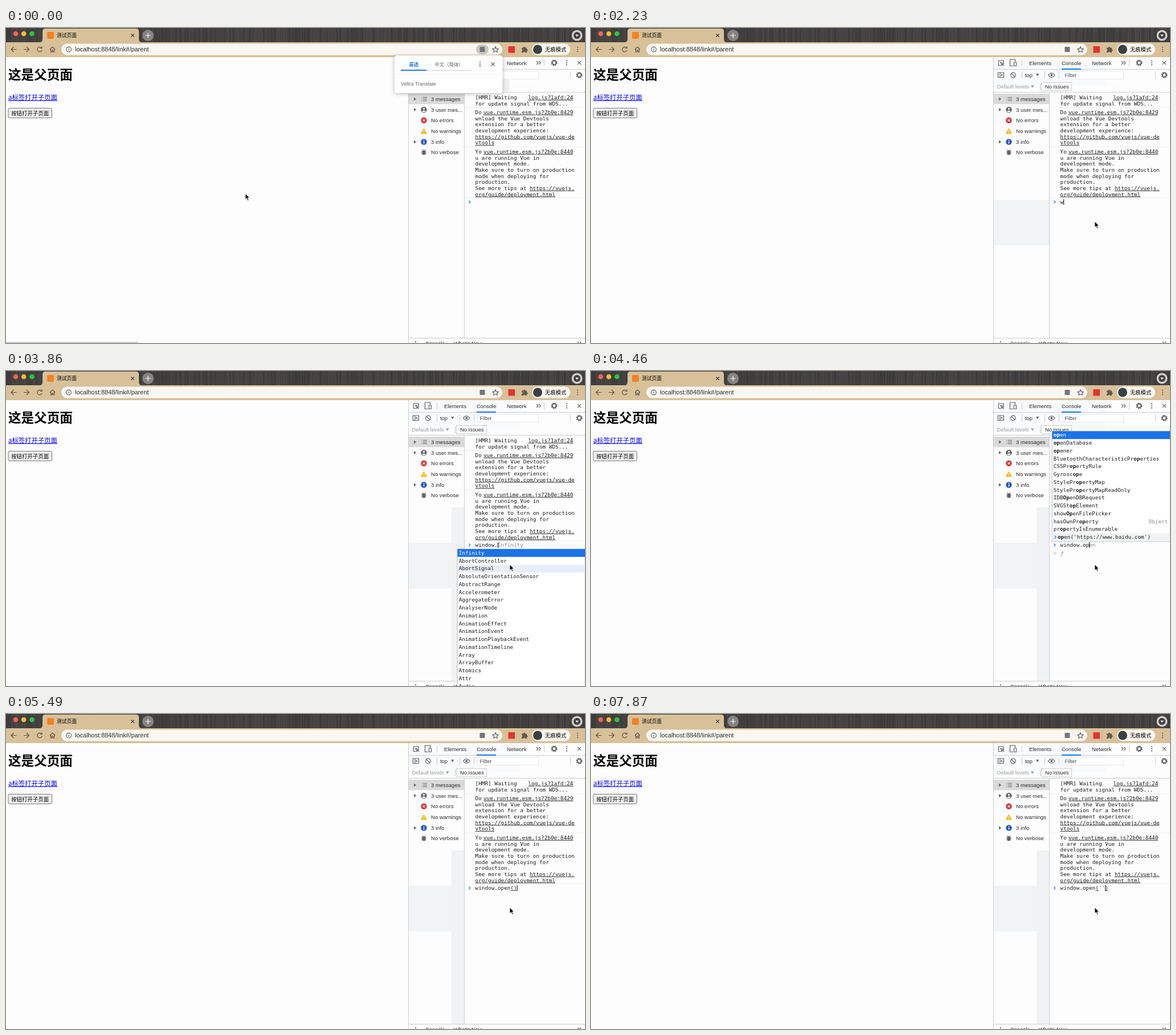
An HTML page that plays this animation: 1015 by 552 pixels, repeating every 8 s.

```html
<!DOCTYPE html>
<html lang="zh">
<head>
<meta charset="utf-8">
<title>测试页面</title>
<style>
  html, body { margin: 0; width: 100%; height: 100%; overflow: hidden; background: #fdfdfd; }
  svg { display: block; width: 100vw; height: 100vh; }
  text { font: 9.4px "Liberation Sans", Arial, sans-serif; fill: #2b2b2b; white-space: pre; }
  .cjk { font-family: "Noto Sans CJK SC", "Noto Sans CJK", sans-serif; fill: #000; }
  .mono { font: 9.33px "DejaVu Sans Mono", monospace; fill: #1c1c1c; }
  .link { text-decoration: underline; }
  .line { fill: none; stroke: #5f6368; stroke-width: 1.2; }
  .thin { stroke: #cacdd1; stroke-width: 1; }
  .faint { stroke: #f0f0f0; stroke-width: 1; }
  .side { font-size: 9.55px; }
  .dim { fill: #8a8a8a; }
  .pale { fill: #9c9c9c; }
  .white { fill: #fff; }
  .red { fill: #c41a16; }
  .bold { font-weight: bold; }
  .float { filter: drop-shadow(0 1px 3px rgba(0, 0, 0, .3)); }
</style>
</head>
<body>
<svg id="stage" viewBox="0 0 1015 552" preserveAspectRatio="none" xmlns="http://www.w3.org/2000/svg"></svg>
<script>
const CHAR = 5.617, ROW = 13.75, LINE = 10.67, LOOP = 8000;
const stage = document.getElementById('stage');

const text = (x, y, s, cls = '', extra = '') => `<text x="${x}" y="${y}" class="${cls}" ${extra}>${s}</text>`;
const mono = (x, y, s, cls = '') => text(x, y, s, 'mono ' + cls);
const cjk = (x, y, s, size, extra = '') => text(x, y, s, 'cjk', `style="font-size:${size}px;${extra}"`);
const rect = (x, y, w, h, fill, extra = '') => `<rect x="${x}" y="${y}" width="${w}" height="${h}" fill="${fill}" ${extra}/>`;
const circle = (x, y, r, fill, extra = '') => `<circle cx="${x}" cy="${y}" r="${r}" fill="${fill}" ${extra}/>`;
const path = (d, cls = 'line', extra = '') => `<path d="${d}" class="${cls}" ${extra}/>`;
const fill = (d, color) => `<path d="${d}" fill="${color}"/>`;
const cross = (x, y, r, extra = '') => path(`M${x - r} ${y - r}l${2 * r} ${2 * r}m0 ${-2 * r}l${-2 * r} ${2 * r}`, 'line', extra);
const dots = (x, y, gap = 3.7) => [-gap, 0, gap].map(d => circle(x, y + d, 1.1, '#5f6368')).join('');
const gear = (x, y) => circle(x, y, 3.4, 'none', 'stroke="#5f6368" stroke-width="2"') +
  circle(x, y, 4.8, 'none', 'stroke="#5f6368" stroke-width="1.6" stroke-dasharray="2 1.77"');

function stripes() {
  let seed = 7, out = rect(0, 0, 1015, 26, '#424140');
  const rnd = () => (seed = seed * 16807 % 2147483647) / 2147483647;
  for (let x = 0; x < 1015; x += 2 + rnd() * 3)
    out += rect(x.toFixed(1), 0, 1.2, 26, rnd() < .5 ? '#2c2b2b' : '#5c5a58', `opacity="${(.15 + rnd() * .4).toFixed(2)}"`);
  return out;
}

function browser() {
  const tan = '#d8c199', ink = 'style="stroke:#5b503d"';
  return stripes() +
    ['#ff5f57', '#febc2e', '#28c840'].map((c, i) => circle(17 + i * 14.2, 10, 4.3, c)).join('') +
    rect(0, 25, 1015, 25.5, tan) +
    fill('M58 25.5Q64 25 64 19V6Q64 1 69 1H228Q233 1 233 6V19Q233 25 239 25.5Z', tan) +
    rect(72, 7, 12, 12, '#f58220', 'rx="2"') +
    cjk(89, 16.4, '测试页面', 8.75) + cross(222, 13, 2.6, 'style="stroke:#222"') +
    circle(249, 13, 10, '#858481') + path('M244.5 13h9m-4.5 -4.5v9', 'line', 'style="stroke:#fff"') +
    circle(1001, 13, 9.5, '#cfccc7') + circle(1001, 13, 6, '#3f3e3d') + fill('M998 11.5h6l-3 4z', '#e8e5e0') +
    path('M18.5 37.5H9m4.5 -4.5l-4.5 4.5l4.5 4.5', 'line', ink) +
    path('M31 37.5h9.5m-4.5 -4.5l4.5 4.5l-4.5 4.5', 'line', ink) +
    path('M62 34.5A4.2 4.2 0 1 0 63 39M63 32.5v3h-3.2', 'line', ink) +
    path('M77 37.5l4.5 -4.5l4.5 4.5M78.5 37v5h2v-3h2v3h2v-5', 'line', ink) +
    rect(97, 27.5, 773, 20, '#faf7f2', 'rx="10"') +
    circle(110, 37.5, 4.3, 'none', 'class="line"') + rect(109.4, 36.8, 1.2, 3, '#5f6368') + rect(109.4, 34.8, 1.2, 1.2, '#5f6368') +
    text(121, 41.3, 'localhost:8848/link#/parent', '', 'style="font-size:10.87px"') +
    '<g id="pill">' + rect(824, 29, 22, 17, '#c9c6c0', 'rx="8.5"') + '</g>' +
    rect(830.5, 33, 9, 9, '#73767a', 'rx="1"') +
    path('M858 32.8l1.5 3.3l3.6 .4l-2.7 2.4l.8 3.5l-3.2 -1.8l-3.2 1.8l.8 -3.5l-2.7 -2.4l3.6 -.4z') +
    rect(880.5, 32, 11.5, 11.5, '#e5322d') +
    fill('M904 34.5h2.8a1.7 1.7 0 0 1 3.4 0h2.8v2.8a1.7 1.7 0 0 1 0 3.4v2.3h-3a1.5 1.5 0 0 0 -3 0h-3v-3a1.5 1.5 0 0 0 0 -3z', '#5f5a50') +
    rect(922, 27.5, 67, 20, '#faf7f2', 'rx="10"') + circle(932, 37.5, 8, '#3c4043') +
    cjk(945, 41, '无痕模式', 9.3) + dots(1002, 37.5) +
    rect(0, 50, 1015, 1, '#cdbb9b');
}

function page() {
  return cjk(4, 90.2, '这是父页面', 22.6, 'font-weight:bold') +
    cjk(4, 125.6, 'a标签打开子页面', 11.35, 'fill:#00e;text-decoration:underline') +
    rect(4, 140.5, 76.5, 17, '#efefef', 'rx="2" stroke="#767676"') +
    cjk(9.2, 152.6, '按钮打开子页面', 9.43);
}

function toolbar() {
  return '<g id="shade"></g>' +
    path('M719 65.5h-4.5v-8.5h8.5v4M718 60l5.5 2.2l-2.3 1l-1 2.3zM721 63l3 3') +
    path('M740 66.500h-5.500v-11.500h9v4M741.500 60h4v6.500h-4z') +
    path('M755.5 55v12M787.5 97v12', 'thin') +
    text(768, 64.5, 'Elements') + text(825, 64.5, 'Console') + text(878, 64.5, 'Network') +
    path('M930 58l3 3l-3 3m4 -6l3 3l-3 3') + path('M943.5 55v12', 'thin') +
    gear(961, 61) + dots(983, 61) + cross(1005, 61, 3.2) +
    path('M706 72.5h309M706 112.5h309M706 543.5h309M803.5 113v430M705.5 51v501', 'thin') +
    rect(825, 71, 34, 2, '#1a73e8') +
    path('M713.5 78h10v8.5h-10zM717 78v8.5m4.5 -6l-2.5 1.8l2.5 1.8') +
    circle(740, 82.5, 4.3, 'none', 'class="line"') + path('M737 79.5l6 6') +
    path('M755.5 76v13M795.5 76v13M820.5 76v13M989.5 76v13', 'thin') +
    text(761, 86, 'top') + fill('M780 80h5.5l-2.75 4.5z', '#6e6e6e') +
    path('M801.5 82.5q5.8 -7.5 11.6 0q-5.8 7.5 -11.6 0z') + circle(807.3, 82.5, 2, '#5f6368') +
    rect(826.5, 75.5, 107, 14, '#fff', 'stroke="#e4e6e8"') + text(830.5, 86.3, 'Filter', '', 'style="fill:#484848"') +
    gear(1005, 82.5) +
    text(711.5, 106, 'Default levels', 'pale') + fill('M771 100.5h5.5l-2.75 4.5z', '#9c9c9c') +
    rect(789.5, 95.5, 53, 14.5, '#fdfdfd', 'stroke="#cacdd1"') + text(796, 106.3, 'No Issues');
}

function sidebar() {
  const tri = y => fill(`M715 ${y - 3}v6l4.5 -3z`, '#6e6e6e');
  const labels = ['3 messages', '3 user mes...', 'No errors', 'No warnings', '3 info', 'No verbose'];
  return rect(706, 115, 97, 18.5, '#dadada') + tri(124.5) + tri(143) + tri(199.5) +
    path('M731 121.5h7m-7 3h7m-7 3h7m-9.5 -6h1m-1 3h1m-1 3h1') +
    circle(732.5, 143.2, 5.2, '#5f6368') + circle(732.5, 141.5, 1.7, '#fff') + fill('M729 146.3q3.5 -3.5 7 0q-3.5 2.6 -7 0z', '#fff') +
    circle(732.5, 161.8, 5.2, '#db3236') + cross(732.5, 161.8, 1.9, 'style="stroke:#fff"') +
    fill('M732.5 175.5l5.5 10h-11z', '#f0b400') + rect(732, 179, 1.2, 3.5, '#fff') + rect(732, 183.3, 1.2, 1.2, '#fff') +
    circle(732.5, 199.5, 5.2, '#2a56c6') + rect(731.8, 198.6, 1.5, 4, '#fff') + rect(731.8, 196.2, 1.5, 1.5, '#fff') +
    rect(730, 214, 5, 8.5, '#5f6368', 'rx="2.5"') + path('M728.5 215.7h8m-8.5 2.5h9m-8.5 2.5h8m-6 -7l-1 -1m5 1l1 -1') +
    labels.map((s, i) => text(745, (128 + i * 18.66).toFixed(1), s, 'side')).join('');
}

function log() {
  const at = (y, i) => (y + i * LINE).toFixed(1);
  const block = (y, lines) => lines.map((s, i) => mono(822.6, at(y, i), s)).join('');
  const link = (x, y, s) => mono(x, y, s, 'link');
  const hmr = 124.8, tools = 150.8, mode = 219.8;
  return path('M804 139.5h211m-211 69h211m-211 89h211', 'faint') +
    block(hmr, ['[HMR] Waiting', 'for update signal from WDS...']) + link(915.5, hmr, 'log.js?1afd:24') +
    block(tools, ['Do', 'wnload the Vue Devtools', 'extension for a better', 'development experience:']) +
    link(837, tools, 'vue.runtime.esm.js?2b0e:8429') +
    link(822.6, at(tools, 4), 'https://github.com/vuejs/vue-de') + link(822.6, at(tools, 5), 'vtools') +
    block(mode, ['Yo', 'u are running Vue in', 'development mode.', 'Make sure to turn on production',
      'mode when deploying for', 'production.', 'See more tips at']) +
    link(837, mode, 'vue.runtime.esm.js?2b0e:8440') +
    link(918, at(mode, 6), 'https://vuejs.') + link(822.6, at(mode, 7), 'org/guide/deployment.html') +
    dots(718, 553.5) + text(735, 556.3, 'Console') + text(785, 556.3, "What's New") + cross(1005, 553, 3.2);
}

function translateBox() {
  return '<g id="bubble">' +
    rect(870, 90, 12, 21, '#efefef') +
    rect(681, 48, 189.5, 66, '#fff', 'rx="4" class="float"') +
    cjk(706.5, 66.5, '英语', 8.4, 'fill:#1a73e8;font-weight:bold') + cjk(751.5, 66.5, '中文（简体）', 8.4, 'fill:#5f6368;font-weight:500') +
    path('M692 74.5h124', 'thin') + rect(692, 73, 45, 1.8, '#1a73e8') + path('M681 81.5h189', 'faint') +
    dots(831, 63.5) + cross(853.5, 63.5, 3) +
    text(692, 100.8, 'Veltra Translate', '', 'style="font-size:8.9px;fill:#666"') + '</g>' +
    '<g id="status">' + rect(0, 550, 232, 3, '#c9c9c9', 'rx="2"') + '</g>';
}

stage.innerHTML = rect(0, 0, 1015, 552, '#fdfdfd') + page() + toolbar() + sidebar() + log() + browser() +
  '<g id="live"></g>' + translateBox() +
  '<path id="arrow" d="M0 0V10.6L2.5 8.3L4.2 12.4L6.1 11.6L4.4 7.7H7.7Z" fill="#000" stroke="#fff" stroke-width=".9"/>';
const [pill, shade, live, bubble, status, arrow] =
  ['pill', 'shade', 'live', 'bubble', 'status', 'arrow'].map(id => document.getElementById(id));

// Suggestion lists; a leading ">" marks a history entry.
const words = s => s.split(' ');
const HISTORY = ">open('https://www.baidu.com')";
const lists = {
  win: { x: 790, q: 'windo', rows: ['window', 'Window', 'WindowControlsOverlay', ">window.open('https://www.baidu.com')"] },
  all: { x: 791.5, q: '', below: true, rows: words('Infinity AbortController AbortSignal AbsoluteOrientationSensor AbstractRange ' +
    'Accelerometer AggregateError AnalyserNode Animation AnimationEffect AnimationEvent AnimationPlaybackEvent ' +
    'AnimationTimeline Array ArrayBuffer Atomics Attr Audio') },
  o: { x: 791.5, q: 'o', below: true, rows: words('open openDatabase opener origin originAgentCluster outerHeight outerWidth ' +
    'onabort onblur onchange onclick onclose onerror onfocus oninput onload onreset onresize') },
  ope: { x: 808.5, q: 'ope', rows: words('open openDatabase opener BluetoothCharacteristicProperties CSSPropertyRule Gyroscope ' +
    'StylePropertyMap StylePropertyMapReadOnly IDBOpenDBRequest SVGStopElement showOpenFilePicker hasOwnProperty ' +
    'propertyIsEnumerable').concat(HISTORY) },
  open: { x: 808.5, q: 'open', rows: words('open openDatabase opener IDBOpenDBRequest showOpenFilePicker').concat(HISTORY) },
  call: { x: 857, q: '', rows: [">('https://www.baidu.com')"] }
};

// Prompt states: start time, typed text, then options.
const typed = [
  [0, '', { caret: -1 }],
  [2230, 'w'], [2530, 'wi'], [2670, 'win'], [2970, 'wind'],
  [3270, 'windo', { list: 'win', hint: 'w' }],
  [3420, 'window', { list: 'win', q: 'window' }],
  [3860, 'window.', { list: 'all', hint: 'Infinity' }],
  [4310, 'window.o', { list: 'o', hint: 'pen' }],
  [4460, 'window.op', { list: 'ope', hint: 'en', q: 'op', fn: true }],
  [4600, 'window.ope', { list: 'ope', hint: 'n', fn: true }],
  [4750, 'window.open', { list: 'open', fn: true }],
  [5200, 'window.open('],
  [5350, 'window.open()'],
  [5490, 'window.open()', { match: true }],
  [6080, 'window.open()', { match: true, caret: 12, list: 'call' }],
  [6680, 'window.open()', { match: true, caret: -1, list: 'call' }],
  [6980, "window.open(')", { caret: 13 }],
  [7130, "window.open('')", { match: true, caret: 14 }],
  [7270, "window.open(''')", { caret: 15 }],
  [7870, "window.open('')", { match: true, caret: 14 }]
];

// Pointer positions: start time, x, y.
const moves = [
  [0, 419.5, 290], [150, 440, 293], [300, 560, 315], [450, 720, 348], [600, 850, 362],
  [740, 903, 359], [890, 893.5, 352], [1040, 887, 343.5], [1190, 883.8, 339.8], [1330, 883, 339]
];

const latest = (track, t) => track.filter(k => k[0] <= t).pop();
const chevron = (x, y) => path(`M${x} ${y - 2.5}l2.8 2.5l-2.8 2.5`, 'line', 'style="stroke:#367cf1"');

function popup({ x, q, rows, below }, query = q) {
  const h = below ? 252 : rows.length * ROW, top = below ? 312 : 298 - h, w = 1015 - x;
  const mark = s => query ? s.replace(new RegExp(query, 'i'), m => `<tspan class="bold">${m}</tspan>`) : s;
  let out = rect(x - 1.5, top - 1, w + 3, h + 3, '#000', 'opacity=".08"') +
    rect(x, top, w, h, '#fff', 'stroke="#c4c6c9" stroke-width=".8"');
  rows.forEach((s, i) => {
    const y = top + i * ROW, base = (y + 9.8).toFixed(2);
    if (s[0] === '>') {
      out += rect(x, y, w, ROW, '#f1f2f3') + chevron(x + 4, y + 7) + mono(x + 9.5, base, mark(s.slice(1)));
      return;
    }
    if (!i) out += rect(x, y, w, ROW, '#1a73e8');
    else if (below && i === 2) out += rect(x, y, w, ROW, '#e8eef9');
    out += mono(x + 2.2, base, mark(s), i ? '' : 'white');
    if (s === 'hasOwnProperty') out += mono(977.5, base, 'Object', 'dim');
  });
  return out;
}

function prompt(s, o = {}) {
  const x0 = 822.6, at = n => x0 + n * CHAR, caret = o.caret ?? s.length;
  let out = chevron(811.3, 305);
  out += mono(x0, 307.7, s.replace(/'+/, m => `<tspan class="red">${m}</tspan>`));
  if (o.hint) out += mono(at(s.length), 307.7, o.hint, 'dim');
  if (o.match) out += [11, s.length - 1].map(n => rect(at(n), 309, CHAR, .9, '#555')).join('');
  if (caret >= 0) out += rect(at(caret), 300, 1, 10, '#000');
  if (o.fn) out += path('M814 317.5l-2.5 2l2.5 2', 'line', 'style="stroke:#bbb"') + circle(815.2, 319.5, .7, '#bbb') +
    text(823, 322.8, '<tspan font-style="italic">ƒ</tspan>', 'mono dim');
  if (o.list) out += popup(lists[o.list], o.q);
  return out;
}

function shading(t) {
  const settled = t >= 1190;
  let out = rect(706, 51, settled ? 196 : 178, settled ? 50 : 60, '#f9fafb');
  if (t >= 600) out += rect(706, 301, 97, 80, '#f1f3f5');
  if (t >= 3270) out += rect(781, 239, 22, 304, '#f1f2f3');
  return out;
}

let shown;
function draw(t) {
  const [, x, y] = latest(moves, t), state = latest(typed, t);
  const show = (el, on) => el.setAttribute('visibility', on ? 'visible' : 'hidden');
  arrow.setAttribute('transform', `translate(${x} ${y})`);
  show(bubble, t < 300);
  show(status, t < 150);
  show(pill, t < 1040);
  shade.innerHTML = shading(t);
  if (state !== shown) live.innerHTML = prompt(state[1], state[2]);
  shown = state;
}

const start = performance.now();
function tick(now) {
  draw(Math.max(0, now - start) % LOOP);
  requestAnimationFrame(tick);
}
draw(0);
requestAnimationFrame(tick);
</script>
</body>
</html>
```
